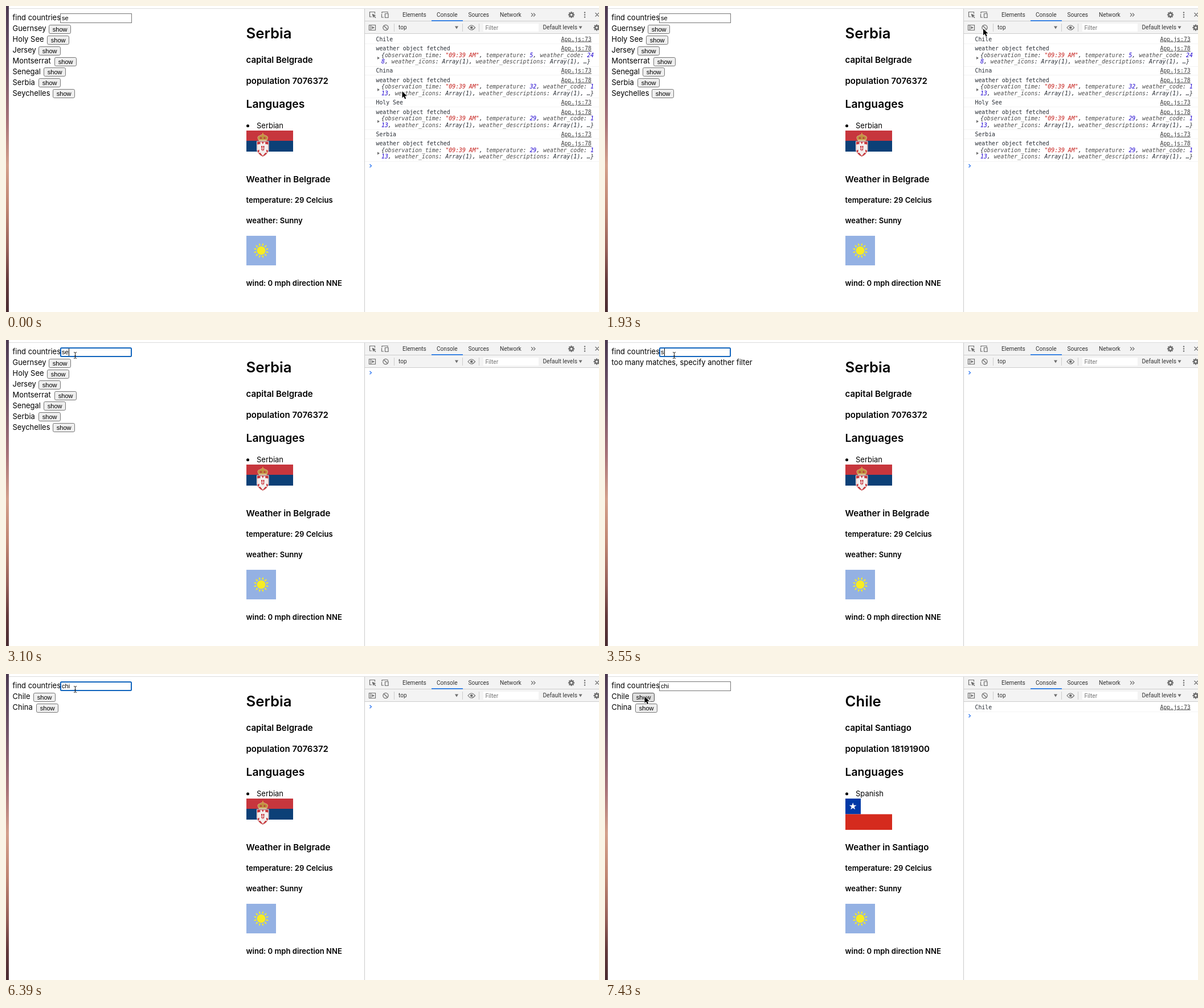
Write an HTML page that moves like this. It is 1041 px wide and 538 px high and loops after 8 s.

```html
<!DOCTYPE html>
<html lang="en">
<head>
<meta charset="utf-8">
<title>Country finder</title>
<style>
  html, body { margin: 0; width: 100%; height: 100%; overflow: hidden; background: #fff; }
  svg { display: block; width: 1041px; height: 538px; }
  text { white-space: pre; }
  .page { font: 12.97px Inter, sans-serif; }
  .head { font-family: Inter, sans-serif; font-weight: 600; }
  .form { font: 11.1px "Liberation Sans", Arial, sans-serif; }
  .tool { font: 10.1px Roboto, sans-serif; fill: #333; }
  .mono { font: 9.83px "DejaVu Sans Mono", monospace; fill: #262b33; }
  .obj { font-style: italic; }
  .link { text-decoration: underline; fill: #3c3c3c; }
  .key { fill: #4a4a4a; }
  .str { fill: #c41a16; }
  .num { fill: #1c00cf; }
  .icon { fill: none; stroke: #6e6e6e; stroke-width: 1.2; }
</style>
</head>
<body>
<svg id="stage" viewBox="0 0 1041 538"></svg>
<script>
const LOOP = 8000;
const ROW = 18.85;

// Each timeline entry is [start time, ...values]; values hold until the next entry.
const pointer = [
  [0, 695.5, 150], [600, 694, 143], [750, 686, 112], [900, 676, 78], [1050, 668, 54],
  [1190, 665, 44], [1340, 664, 40], [2220, 610, 52], [2370, 420, 88], [2520, 180, 66],
  [2660, 54, 40], [2810, 121.5, 26], [6540, 104, 32], [6690, 76, 39], [6830, 69.5, 39.5],
];
const typed = [[0, 'se'], [3550, 's'], [4000, ''], [4600, 'c'], [5640, 'ch'], [5940, 'chi']];
const caretX = { se: 110.5, s: 104.5, '': 98.5, c: 104.5, ch: 110.5, chi: 113.5 };

// Country name and the left edge of its button.
const matches = {
  se: [['Guernsey', 75.5], ['Holy See', 72.5], ['Jersey', 57.5], ['Montserrat', 85.5],
       ['Senegal', 66.5], ['Serbia', 57.5], ['Seychelles', 82.5]],
  chi: [['Chile', 48.5], ['China', 53.5]],
};
const logs = [['Chile', 5, '24', '8'], ['China', 32, '1', '13'],
              ['Holy See', 29, '1', '13'], ['Serbia', 29, '1', '13']];

const at = (line, t) => line.filter(e => e[0] <= t).pop().slice(1);
const text = (cls, x, y, str, extra = '') => `<text class="${cls}" x="${x}" y="${y}" ${extra}>${str}</text>`;
const rect = (x, y, w, h, fill, extra = '') =>
  `<rect x="${x}" y="${y}" width="${w}" height="${h}" fill="${fill}" ${extra}/>`;
const path = (d, extra) => `<path d="${d}" ${extra}/>`;
const icon = d => path(d, 'class="icon"');
const solid = (d, fill = '#6e6e6e') => path(d, `fill="${fill}"`);
const circle = (x, y, r, fill, extra = '') => `<circle cx="${x}" cy="${y}" r="${r}" fill="${fill}" ${extra}/>`;
const heading = (size, y, str) => text('head', 421.5, y, str, `style="font-size:${size}px"`);
const spokes = (n, shape, phase = 0) =>
  Array.from({ length: n }, (_, i) => `<g transform="rotate(${phase + i * 360 / n})">${shape}</g>`).join('');

function gear(x, y) {
  return `<g transform="translate(${x} ${y})">${circle(0, 0, 3, 'none', 'stroke="#6e6e6e" stroke-width="2.4"')}
    ${spokes(8, rect(-1.1, -5.6, 2.2, 2.4, '#6e6e6e'))}</g>`;
}

function wallpaper() {
  const stops = [[0, '#4d3a50'], [8, '#5b455c'], [20, '#75566a'], [38, '#a9747a'], [52, '#d3a08c'],
                 [66, '#c08673'], [80, '#96605a'], [90, '#643a3c'], [100, '#4a2c32']];
  return `<defs><linearGradient id="dusk" x2="0" y2="1">${stops.map(([o, c]) =>
    `<stop offset="${o}%" stop-color="${c}"/>`).join('')}</linearGradient></defs>` + rect(0, 0, 5, 538, 'url(#dusk)');
}

function toolbars(hoverClear) {
  const tabs = [['Elements', 696], ['Console', 756], ['Sources', 811.5], ['Network', 867]];
  const lines = [681, 801, 830].map(x => rect(x, 31, 1, 14, '#ccc')).join('');
  const clear = hoverClear ? '#333' : '#6e6e6e';
  return rect(5, 4, 1036, 1, '#dcdcdc') + rect(630, 5, 411, 43, '#f3f3f3') +
    rect(629, 5, 1, 533, '#cbcbcb') + rect(630, 26, 411, 1, '#cdcdcd') + rect(630, 48, 411, 1, '#cdcdcd') +
    rect(747, 25, 55, 1.6, '#1a73e8') + rect(838, 31, 97, 14, '#fff') + lines +
    tabs.map(([name, x]) => text('tool', x, 19, name)).join('') +
    icon('M642 19h-3.5v-8.5h9v3M663 20h-3.5v-6M660 13v-2.5h10v2M665.5 13.5h5.5v7h-5.5z') +
    solid('M642.5 13.5l7 3-2.7 1 2.7 2.8-1 1-2.8-2.8-1 2.5z') +
    icon('M922 12.5l3 3-3 3M926 12.5l3 3-3 3M1034.5 12l6.5 6.5M1041 12l-6.5 6.5') +
    gear(992.5, 15.5) + gear(1037, 38) +
    [11.5, 15.5, 19.5].map(y => circle(1016, y, 1.2, '#6e6e6e')).join('') +
    icon('M637.5 33.5h11v9h-11zM640.5 33.5v9') + solid('M642.5 35.5l4.5 2.5-4.5 2.5z') +
    circle(666.5, 38, 4.6, 'none', `stroke="${clear}" stroke-width="1.3"`) +
    path('M663.3 34.8l6.4 6.4', `stroke="${clear}" stroke-width="1.3"`) +
    text('tool', 689, 41, 'top') + solid('M788 35.5h6l-3 5z') +
    icon('M811 38q6-8 12.5 0q-6.5 8-12.5 0z') + circle(817.2, 38, 2.3, '#6e6e6e') +
    text('tool', 841.5, 41.5, 'Filter', 'style="fill:#757575"') +
    text('tool', 942.5, 41, 'Default levels') + solid('M1005.5 35.5h6l-3 5z');
}

const colour = line => line.replace(/"[^"]*"|[a-z_]+(?=:)|\b\d+(?=,|$)/g, token => {
  const cls = token[0] === '"' ? 'str' : /\d/.test(token) ? 'num' : 'key';
  return `<tspan class="${cls}">${token}</tspan>`;
});

function entry(y, label, source) {
  return text('mono', 649.5, y, label) + text('mono link', 974.5, y, source);
}

function consoleLog(t) {
  const rule = y => rect(630, Math.round(y), 411, 1, '#f4f4f4');
  let out = '', promptY = 57.5;
  if (t < 2080) {
    logs.forEach(([name, degrees, code, rest], i) => {
      const y = 61.5 + i * 55.8;
      out += entry(y, name, 'App.js:73') + rule(y + 4) + entry(y + 16.5, 'weather object fetched', 'App.js:78') +
        solid(`M652 ${y + 27.5}l4 2.5-4 2.5z`) +
        text('mono obj', 659, y + 28, colour(`{observation_time: "09:39 AM", temperature: ${degrees}, weather_code: ${code}`)) +
        text('mono obj', 659, y + 39.5, colour(`${rest}, weather_icons: Array(1), weather_descriptions: Array(1), …}`)) +
        rule(y + 44);
    });
    promptY = 281;
  } else if (t >= 6980) {
    out = entry(61.5, 'Chile', 'App.js:73') + rule(65.5);
    promptY = 73.5;
  }
  return out + path(`M638.5 ${promptY - 2.7}l3 2.7-3 2.7`, 'fill="none" stroke="#367cf1" stroke-width="1.4"');
}

function button(x, y, hover) {
  return rect(x, y, 38, 15, hover ? '#dedede' : '#efefef',
    `rx="2.3" stroke="${hover ? '#4c4c4c' : '#767676'}"`) + text('form', x + 6.2, y + 11, 'show');
}

function search(t) {
  const [value] = at(typed, t);
  const focused = t >= 2950 && t < 6830;
  const caret = focused && !(t >= 5050 && t < 5500) && t < 6390;
  const hover = t >= 6690;
  let out = text('page', 11.5, 25.3, 'find countries') +
    (focused ? rect(96, 14, 124, 15, '#fff', 'rx="1.5" stroke="#1064bd" stroke-width="2"')
             : rect(95.5, 13.5, 125, 16, '#fff', 'stroke="#767676"')) +
    text('form', 98, 25.3, value);
  if (caret) out += rect(caretX[value] - 0.5, 15, 1, 13, '#000');
  if (matches[value]) {
    matches[value].forEach(([name, x], i) => {
      out += text('page', 11.5, 44.4 + i * ROW, name) + button(x, 33.5 + Math.round(i * ROW), hover && i === 0);
    });
  } else if (value) {
    out += text('page', 11.5, 44.4, 'too many matches, specify another filter');
  }
  return out;
}

function serbianFlag() {
  const crown = path('M443.5 236q-4-7 2-8q5-4 10.500 0q6 1 2 8z', 'fill="#c0903f" stroke="#ead9b8" stroke-width=".6"') +
    circle(447.5, 232, 1.6, '#b8343a') + circle(454, 232, 1.6, '#b8343a') + rect(450, 223, 1.6, 4.5, '#d8a43c') +
    rect(444, 235, 13.5, 2.5, '#dfc08a');
  const shield = path('M440.5 238h20.500v15q-1 8-10.250 12q-9.250-4-10.250-12z',
    'fill="#c6363c" stroke="#eee4e0" stroke-width="1"');
  const eagle = solid('M450.8 243l-2-4-3 1 1 2.500-5.500 1v11l3-2 .5 3-2.500 3 4-.5 4.500 5.500 4.500-5.500 4 .5-2.500-3 .5-3 3 2v-11l-5.500-1 1-2.500-3-1z', '#f4efee');
  const badge = solid('M448 246h5.500v5q-.5 3-2.750 4q-2.250-1-2.750-4z', '#c6363c') +
    path('M450.75 246v8.500M448 250h5.500', 'stroke="#fff"');
  return rect(422, 219, 82, 18, '#c7363d') + rect(422, 237, 82, 19, '#0c4077') + crown + shield + eagle + badge;
}

function chileanFlag() {
  const star = Array.from({ length: 10 }, (_, i) => {
    const r = i % 2 ? 2.6 : 6.8, a = i * Math.PI / 5;
    return `${435.2 + r * Math.sin(a)},${232.8 - r * Math.cos(a)}`;
  }).join(' ');
  return rect(422, 219, 27, 27.5, '#0039a6') + rect(422, 246.5, 82, 27.5, '#d52b1e') +
    `<polygon points="${star}" fill="#fff"/>`;
}

function details(t) {
  const [name, capital, people, language] = t < 6980
    ? ['Serbia', 'Belgrade', 7076372, 'Serbian'] : ['Chile', 'Santiago', 18191900, 'Spanish'];
  const sun = `<g transform="translate(448 430)">${circle(0, 0, 7.6, '#f7ec24')}${
    spokes(12, solid('M-1.7-9.3h3.4l-1.7-4.7z', '#f7ec24'), 15)}</g>`;
  return heading(25.7, 56.5, name) + heading(15, 100.3, 'capital ' + capital) +
    heading(15, 137.2, 'population ' + people) + heading(19.3, 179, 'Languages') +
    circle(424.5, 210.8, 2.5, '#000') + text('page', 440, 215, language) +
    (t < 7430 ? serbianFlag() : chileanFlag()) +
    heading(15.1, 310.2, 'Weather in ' + capital) + heading(13.1, 346.3, 'temperature: 29 Celcius') +
    heading(13.1, 381.7, 'weather: Sunny') + rect(422, 404, 52, 52, '#94b1e3') + sun +
    heading(13.1, 491.5, 'wind: 0 mph direction NNE');
}

function cursor(t) {
  const [x, y] = at(pointer, t);
  const beam = t >= 2810 && t < 6690;
  const shape = beam
    ? path('M-2.5-4.5q2.5 0 2.5 1.5q0-1.5 2.5-1.5M0-3v8M-2.5 6.5q2.5 0 2.5-1.5q0 1.5 2.5 1.5M-1.5 2h3', 'fill="none" stroke="#222"')
    : path('M0 0v11.5l2.7-2.5 2 4.5 2-.9-2-4.4h3.7z', 'stroke="#fff" stroke-width="1.6" paint-order="stroke"');
  return `<g transform="translate(${x} ${y})">${shape}</g>`;
}

const stage = document.getElementById('stage');
let shown = '';

function frame(now) {
  const t = now % LOOP;
  const picture = wallpaper() + search(t) + details(t) + toolbars(t >= 2080 && t < 2220) + consoleLog(t) + cursor(t);
  if (picture !== shown) stage.innerHTML = shown = picture;
  requestAnimationFrame(frame);
}
frame(performance.now());
</script>
</body>
</html>
```
